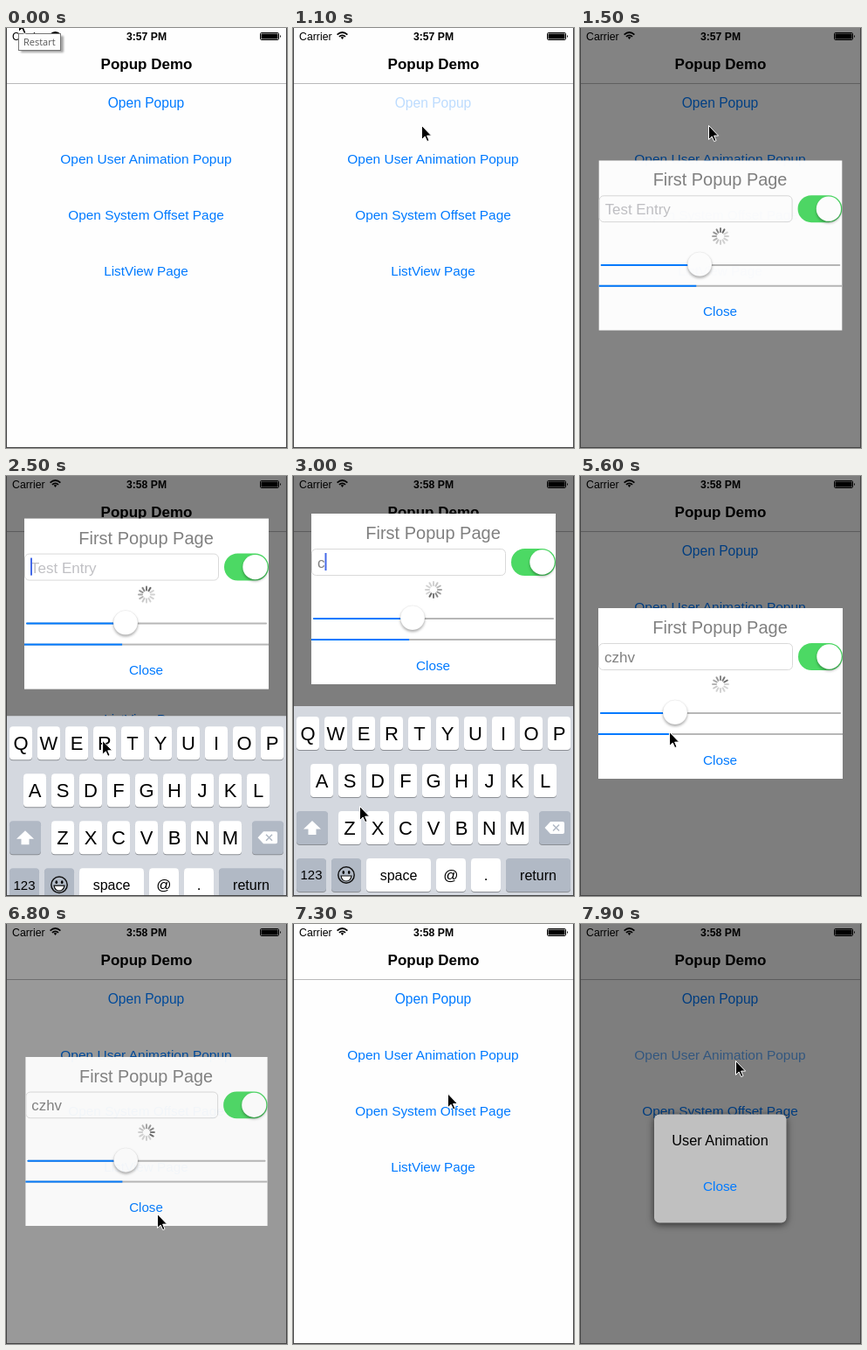
Recreate the animation shown at these times as an HTML page. Size 322x480 px, loop 8 s.

```html
<!DOCTYPE html>
<html lang="en">
<head>
<meta charset="utf-8">
<title>Popup demo</title>
<style>
  html, body { margin: 0; width: 100%; height: 100%; overflow: hidden; background: #fff; }
  svg { display: block; width: 322px; height: 480px; overflow: hidden;
        font-family: "Liberation Sans", Arial, sans-serif; }
  text { white-space: pre; }
  .mid { text-anchor: middle; }
  .bold { font-weight: bold; }
  .link { fill: #007aff; }
  .knob { fill: #fff; filter: drop-shadow(0 2px 1.5px rgba(0,0,0,.32)); }
  #card { filter: drop-shadow(0 2px 4px rgba(0,0,0,.65)); }
</style>
</head>
<body>
<svg viewBox="0 0 322 480">
  <rect width="322" height="480" fill="#fefefe"/>
  <g id="page">
    <rect y="63" width="322" height="1" fill="#b9b9bb"/>
    <text x="7" y="13.5" font-size="12.3">Carrier</text>
    <g fill="none" stroke="#000" stroke-width="1.7">
      <path d="M50.6 7.6Q56.5 2.4 62.4 7.6M52.9 9.8Q56.5 6.8 60.1 9.8"/>
      <path d="M54.6 10.6Q56.5 9.2 58.4 10.6L56.5 12.9Z" fill="#000" stroke="none"/>
    </g>
    <text id="clock" class="mid bold" x="161" y="13.5" font-size="12.2"></text>
    <rect x="291.5" y="5.5" width="21" height="8" rx="1.2" fill="none" stroke="#000"/>
    <rect x="293" y="7" width="18" height="5"/>
    <rect x="292.5" y="6.5" width="19" height="6"/>
    <path d="M314 8Q316 9.5 314 11Z"/>
    <text class="mid bold" x="161" y="47" font-size="17">Popup Demo</text>
    <g id="links"></g>
  </g>
  <rect id="dim" width="322" height="480"/>

  <g id="popup">
    <rect x="21" y="151" width="280" height="195" fill="#fff"/>
    <text class="mid" x="160.5" y="180" font-size="20" fill="#808080">First Popup Page</text>
    <rect x="21.5" y="191.5" width="222" height="30" rx="5" fill="#fff" stroke="#d9d9d9"/>
    <text id="entry" x="28" y="213" font-size="17"></text>
    <rect id="caret" y="196" width="2" height="20" fill="#4469e8"/>
    <rect x="250" y="191" width="51" height="31" rx="15.5" fill="#4cd964"/>
    <circle class="knob" cx="285.5" cy="206.5" r="14.2"/>
    <g id="spinner" stroke="#606060" stroke-width="2" stroke-linecap="round"></g>
    <rect x="23" y="270" width="276" height="2" rx="1" fill="#b7b7b7"/>
    <rect id="fill" x="23" y="270" height="2" rx="1" fill="#007aff"/>
    <rect x="21" y="294" width="280" height="2" fill="#b7b7b7"/>
    <rect id="bar" x="21" y="294" height="2" fill="#007aff"/>
    <circle id="thumb" class="knob" cy="270" r="14" stroke="#000" stroke-opacity=".1" stroke-width=".5"/>
    <text class="mid link" x="160.5" y="329.5" font-size="15.3">Close</text>
  </g>

  <g id="card">
    <rect x="85" y="219" width="151.5" height="124" rx="6" fill="#c0c0c0"/>
    <text class="mid" x="160.5" y="254.5" font-size="16.3">User Animation</text>
    <text class="mid link" x="160.5" y="306.5" font-size="15.3">Close</text>
  </g>

  <g id="keys"></g>

  <path d="M0 0H1V479H322V480H0ZM321 0H322V480H321Z" fill="#444"/>

  <g id="tip">
    <rect x="17" y="9" width="49" height="19" rx="1" fill="#000" opacity=".35" style="filter:blur(1px)"/>
    <rect x="14.5" y="6.5" width="48" height="19" fill="#fdfdfd" stroke="#767676"/>
    <text x="20" y="20" font-size="11" fill="#575757" font-family="Open Sans, Noto Sans, sans-serif">Restart</text>
  </g>
  <path id="cursor" d="M.5 .5V16.5L4.2 13L6.7 18.6L9 17.6L6.6 12.1H11.6Z" stroke="#fff" stroke-width="1" stroke-linejoin="round"/>
</svg>
<script>
const LOOP = 8000;
const $ = id => document.getElementById(id);
const set = (id, attrs) => {
  for (const k in attrs) $(id).setAttribute(k, attrs[k]);
};
const clamp = v => Math.min(1, Math.max(0, v));
const part = (t, start, length) => clamp((t - start) / length);
const cubicOut = p => 1 - (1 - p) ** 3;
const sinOut = p => Math.sin(p * Math.PI / 2);
const sinIn = p => 1 - Math.cos(p * Math.PI / 2);

// Rows are [time, ...values]; eased between rows, held outside them.
function track(rows, t) {
  const i = rows.findIndex(r => r[0] > t);
  if (i === 0) return rows[0].slice(1);
  if (i < 0) return rows[rows.length - 1].slice(1);
  const a = rows[i - 1], b = rows[i];
  const p = (t - a[0]) / (b[0] - a[0]), e = p * p * (3 - 2 * p);
  return a.slice(1).map((v, k) => v + (b[k + 1] - v) * e);
}

// Last row whose time has passed.
const step = (rows, t) => rows.reduce((v, r) => t >= r[0] ? r[1] : v, rows[0][1]);

const CURSOR = [
  [250, 14, -12], [600, 147, 142], [800, 147, 111], [1520, 147, 111],
  [1950, 95, 203], [2300, 95, 203], [2700, 125, 399], [2820, 125, 399],
  [3000, 76, 377], [3100, 64, 400], [3180, 64, 400], [3400, 192, 350],
  [3480, 192, 350], [3650, 160, 402], [3720, 160, 402], [3920, 289, 456],
  [4320, 289, 456], [4880, 130, 272], [5000, 130, 272], [5250, 194, 280],
  [5600, 102, 292], [5750, 102, 292], [6080, 212, 288], [6350, 130, 284],
  [6600, 172, 329], [6700, 173, 331], [6950, 173, 331], [7450, 178, 156]
];
const THUMB = [
  [5000, 137], [5250, 201], [5600, 109], [5750, 109], [6080, 219], [6350, 137]
];
const TYPED = [[0, ""], [2760, "c"], [3140, "cz"], [3440, "czh"], [3690, "czhv"]];
const PRESS = [
  [[1050, 1], [1080, .25], [1220, .3], [1350, 1]],
  [[7640, 1], [7680, .4], [7900, .6], [8000, .75]]
];

const LINKS = [
  ["Open Popup", 15.6], ["Open User Animation Popup", 15.5],
  ["Open System Offset Page", 15.4], ["ListView Page", 15.3]
];
$("links").innerHTML = LINKS.map(([label, size], i) =>
  `<text class="mid link" id="link${i}" x="160.5" y="${90.5 + 64 * i}" font-size="${size}">${label}</text>`).join("");

$("spinner").innerHTML = Array.from({ length: 12 }, (_, i) =>
  `<path d="M161 233V229" transform="rotate(${i * 30} 161 238)"/>`).join("");

function key(x, y, w, label = "", size = 22, color = "#fff") {
  const base = y + 19 + size * .36;
  return `<rect x="${x}" y="${y + 1}" width="${w}" height="38" rx="4" fill="#8b8e94"/>
    <rect x="${x}" y="${y}" width="${w}" height="38" rx="4" fill="${color}"/>
    <text class="mid" x="${x + w / 2}" y="${base}" font-size="${size}">${label}</text>`;
}

function buildKeys() {
  const dark = "#b1b9c5";
  const rows = [["QWERTYUIOP", 4, 275], ["ASDFGHJKL", 20, 329], ["ZXCVBNM", 52, 383]];
  const letters = rows.map(([chars, x, y]) =>
    [...chars].map((c, i) => key(x + 32 * i, y, 26, c)).join("")).join("");
  $("keys").innerHTML = `<rect y="263" width="322" height="217" fill="#d4d8df"/>` + letters +
    key(4, 383, 36, "", 16, dark) + key(282, 383, 36, "", 16, dark) +
    key(4, 437, 34, "123", 15, dark) + key(44, 437, 34, "", 16, dark) +
    key(84, 437, 74, "space", 16) + key(164, 437, 34, "@", 17) +
    key(204, 437, 34, ".", 17) + key(244, 437, 74, "return", 16, dark) +
    `<path d="M22 394L32 403.5H26.5V410H17.5V403.5H12Z" fill="#fff"/>
     <path d="M288.5 402L295 395H309Q311 395 311 397V407Q311 409 309 409H295Z" fill="#fff"/>
     <path d="M298 398.5L305 405.5M305 398.5L298 405.5" stroke="${dark}" stroke-width="1.5"/>
     <circle cx="61" cy="456" r="9.2" fill="none" stroke="#111" stroke-width="1.5"/>
     <ellipse cx="57.8" cy="453" rx="1.3" ry="1.9"/><ellipse cx="64.2" cy="453" rx="1.3" ry="1.9"/>
     <path d="M55 457H67Q66 463 61 463T55 457Z" fill="#fff" stroke="#111" stroke-width="1.2"/>`;
}
buildKeys();

function drawPopup(t) {
  const shown = sinOut(part(t, 1243, 300));
  const out = part(t, 6740, 300), gone = sinIn(out);
  const lift = cubicOut(part(t, 2250, 400)) - cubicOut(part(t, 4257, 400));
  const scale = .8 + .2 * (shown - gone);
  const dim = .5 * (shown - out) + .5 * part(t, 7690, 100);
  set("dim", { opacity: dim });
  set("popup", {
    opacity: shown - gone,
    visibility: shown > 0 && gone < 1 ? "visible" : "hidden",
    transform: `translate(161 ${248.5 - 108 * lift}) scale(${scale}) translate(-161 -248.5)`
  });
  set("keys", { transform: `translate(0 ${217 * (1 - lift)})` });

  const text = step(TYPED, t);
  $("entry").textContent = text || "Test Entry";
  set("entry", { fill: text ? "#808080" : "#c0c0c4" });
  const caretX = 28 + (text ? $("entry").getComputedTextLength() : 0);
  set("caret", { x: caretX, opacity: t > 2250 && t < 4250 ? 1 : 0 });

  const [x] = track(THUMB, t);
  set("thumb", { cx: x });
  set("fill", { width: x - 23 });
  set("bar", { width: 280 * (x - 36.5) / 251 });

  const head = Math.floor(t * 12 / 1000) + 7;
  [...$("spinner").children].forEach((spoke, i) => {
    const age = ((head - i) % 12 + 12) % 12;
    spoke.setAttribute("opacity", Math.max(.28, .95 - age * .1));
  });
}

function draw(t) {
  $("clock").textContent = t < 2300 ? "3:57 PM" : "3:58 PM";
  set("tip", { visibility: t < 350 ? "visible" : "hidden" });
  PRESS.forEach((rows, i) => set("link" + i, { opacity: track(rows, t)[0] }));
  drawPopup(t);
  const rise = 302 * (1 - cubicOut(part(t, 7778, 250))) - 41;
  set("card", {
    visibility: t > 7778 ? "visible" : "hidden",
    transform: `translate(0 ${rise})`
  });
  set("cursor", { transform: `translate(${track(CURSOR, t).join(" ")})` });
}

const start = performance.now();
function tick(now) {
  draw(Math.max(0, now - start) % LOOP);
  requestAnimationFrame(tick);
}
draw(0);
requestAnimationFrame(tick);
</script>
</body>
</html>
```
